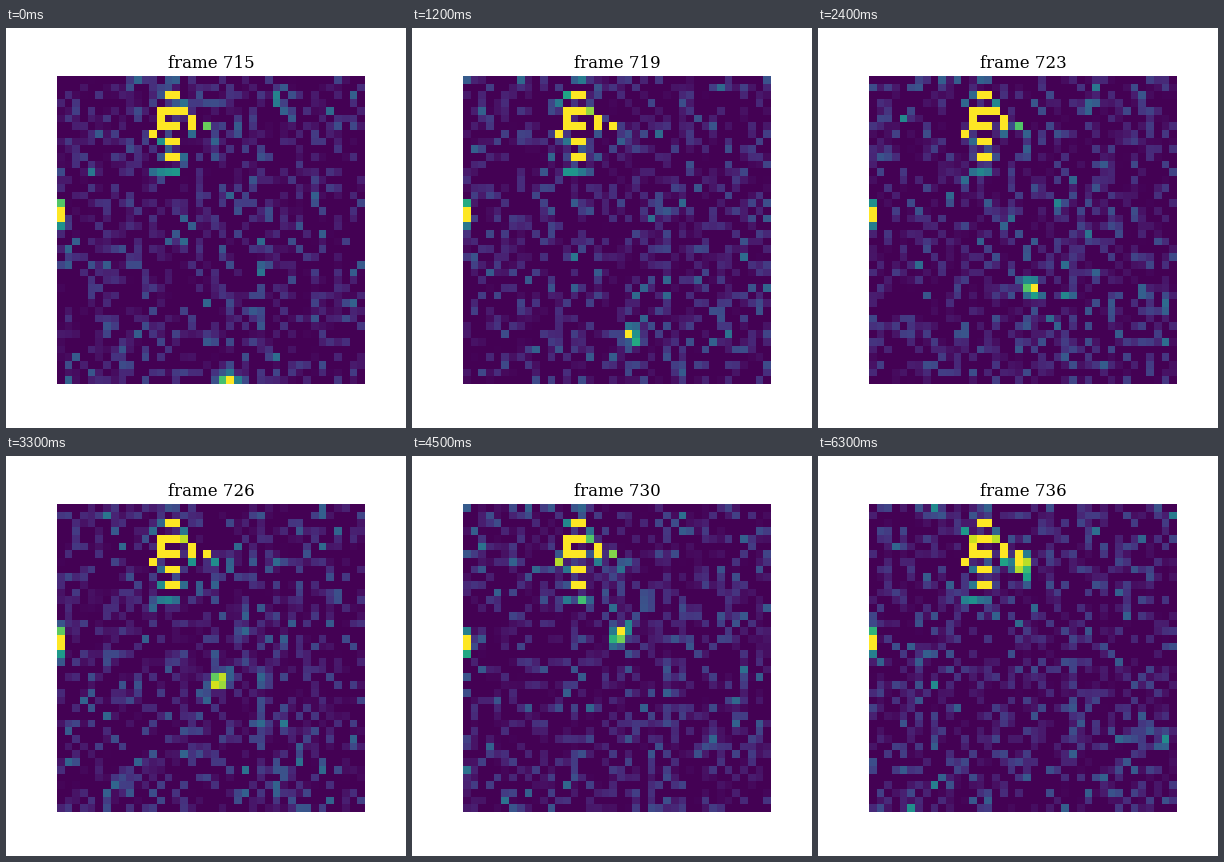
A matplotlib script for the animation above (6600 ms loop, 400 by 400 pixels).

```python
import matplotlib.pyplot as plt
import numpy as np
from matplotlib.animation import FuncAnimation

SIZE = 40
FRAMES = 22
FIRST = 715
NOISE = 0.125
FULL = 1.5  # far enough above 1 to stay saturated under the noise
ROWS, COLS = np.mgrid[:SIZE, :SIZE]


def add_comb(field):
    """Five bright teeth on every other row, joined on the left, with a hook."""
    for row in range(2, 11, 2):
        field[row, 13] = 0.3
        field[row, 14:16] = FULL
    field[4:7, 13] = 1.1
    field[4, 16] = 0.9
    field[5:7, 17] = FULL
    field[7, 17] = 0.45
    field[7, 12] = 1.2
    field[3, [12, 16]] = 0.35
    field[6, 19] = 0.9
    field[12, 12:16] = np.linspace(0.25, 0.45, 4)


def add_streaks(field):
    """Faint lines that show through the noise in every picture."""
    field[0, 14:16] += 0.25
    field[:2, 6:10] += 0.1
    field[1:6, 2] += 0.12
    field[1:4, 28:30] += 0.14
    field[7:11, 20] += 0.22
    field[20:33, 26] += 0.12
    field[28:31, 38] += 0.18


def background():
    field = np.random.default_rng(7).normal(0, 0.05, (SIZE, SIZE))
    add_streaks(field)
    add_comb(field)
    field[:, 0] += 1.8 * np.exp(-(np.arange(SIZE) - 17.35) ** 2 / 2)
    return field


def spot(step):
    """A soft spot climbing at constant speed, leaning to the left."""
    row = 39.2 - 1.52 * step
    col = 21.75 - 0.12 * step
    dist2 = (ROWS - row) ** 2 + (COLS - col) ** 2
    return np.exp(-dist2 / 1.1) + 0.1 * np.exp(-dist2 / 6)


BASE = background()


def picture(step):
    noise = np.random.default_rng(FIRST + step).normal(0, NOISE, BASE.shape)
    # Row 0 is the top row here, while the image is drawn from the bottom up.
    return np.clip(BASE + spot(step) + noise, 0, 1)[::-1]


fig, ax = plt.subplots(figsize=(4, 4), dpi=100)
ax.axis("off")
image = ax.imshow(picture(0), cmap="viridis", vmin=0, vmax=1,
                  origin="lower", interpolation="nearest")
title = ax.set_title(f"frame {FIRST}", fontfamily="DejaVu Serif", fontsize=12)


def update(step):
    image.set_data(picture(step))
    title.set_text(f"frame {FIRST + step}")
    return image, title


anim = FuncAnimation(fig, update, frames=FRAMES, interval=300,
                     repeat=True, repeat_delay=0, blit=False)
plt.show()
```
